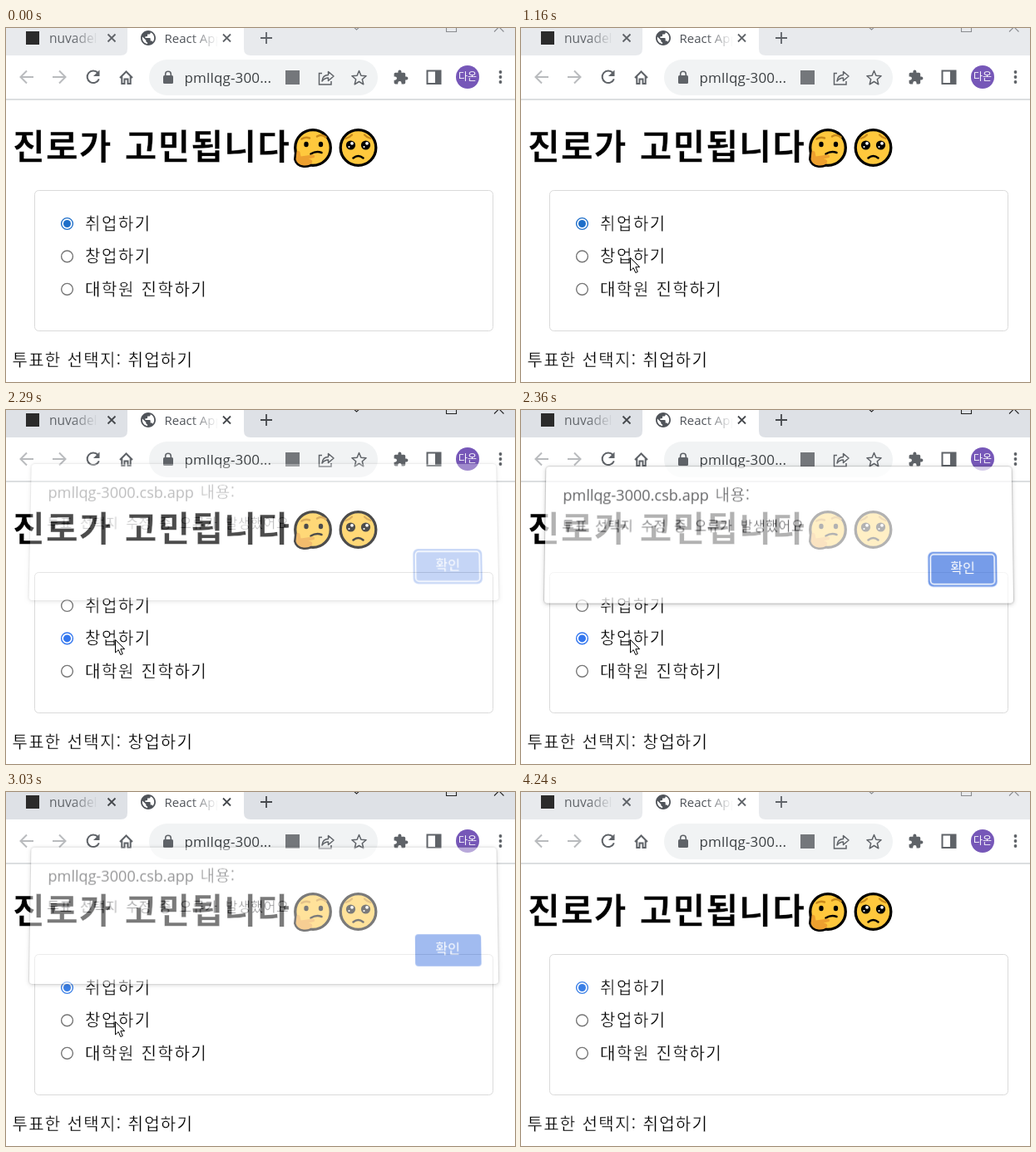
Recreate the animation shown at these times as an HTML page. Size 612 by 426 pixels, loop 4450 ms.

```html
<!DOCTYPE html>
<html lang="ko">
<head>
<meta charset="utf-8">
<title>투표</title>
<style>
html, body { margin: 0; width: 100%; height: 100%; overflow: hidden; background: #fff; }
svg { display: block; }
#page { position: absolute; left: 0; top: 0; }
#dialog {
  position: absolute; left: 30px; top: 81px; width: 560px; height: 163px;
  background: #fff; border-radius: 4px;
  box-shadow: 0 0 0 1px rgba(0,0,0,.16), 0 1px 5px rgba(0,0,0,.38);
}
text { white-space: pre; }
.ko { font-family: "Noto Sans CJK KR", "Noto Sans CJK", sans-serif; }
.en { font-family: "Open Sans", "Noto Sans", sans-serif; }
.body { font-size: 20px; letter-spacing: 1.55px; word-spacing: .5px; fill: #000; }
#result { letter-spacing: 1.25px; word-spacing: .3px; }
/* a hairline in the page colour gives lighter strokes */
.thin { stroke: #fff; stroke-width: .35px; }
.line { fill: none; stroke: #5f6368; stroke-width: 2; }
</style>
</head>
<body>
<svg id="page" width="612" height="426" viewBox="0 0 612 426">
  <defs>
    <linearGradient id="fadeA" gradientUnits="userSpaceOnUse" x1="80" x2="111" y1="0" y2="0">
      <stop stop-color="#5f6368"/><stop offset="1" stop-color="#5f6368" stop-opacity="0"/>
    </linearGradient>
    <linearGradient id="fadeB" gradientUnits="userSpaceOnUse" x1="222" x2="255" y1="0" y2="0">
      <stop stop-color="#50545a"/><stop offset="1" stop-color="#50545a" stop-opacity="0"/>
    </linearGradient>
    <path id="hand" d="M349.5 148.5Q352 146.5 353.5 149.5L354.5 154.5L368.5 152.5Q372.5 153 370.5 156L363.5 157.5Q369.5 158 368 162Q365 166 358 165.500Q350 164.500 348.500 158Z"/>
  </defs>

  <!-- tab strip -->
  <rect id="strip" width="612" height="33"/>
  <path d="M138 33Q146 33 146 25V0H286V25Q286 33 294 33Z" fill="#fff"/>
  <rect x="24" y="4" width="16" height="16" fill="#2b2b2b"/>
  <text class="en" x="52" y="17.5" font-size="15.5" fill="url(#fadeA)">nuvadel</text>
  <path transform="translate(160.2 1.2) scale(.9)" fill="#50545a" d="M12 2C6.48 2 2 6.48 2 12s4.48 10 10 10 10-4.48 10-10S17.52 2 12 2zm-1 17.93c-3.95-.49-7-3.85-7-7.93 0-.62.08-1.21.21-1.79L9 15v1c0 1.1.9 2 2 2v1.93zm6.9-2.54c-.26-.81-1-1.39-1.9-1.39h-1v-3c0-.55-.45-1-1-1H8v-2h2c.55 0 1-.45 1-1V7h2c1.1 0 2-.9 2-2v-.41c2.93 1.19 5 4.06 5 7.41 0 2.08-.8 3.97-2.1 5.39z"/>
  <text class="en" x="190.5" y="17.5" font-size="15" fill="url(#fadeB)">React App</text>
  <g id="tabMarks" fill="none" stroke-width="1.8">
    <path d="M122.5 7.5l9 9m0-9l-9 9M261 7.5l9 9m0-9l-9 9"/>
    <path d="M306 12H320M313 5V19"/>
  </g>
  <g id="winMarks" fill="none" stroke-width="1.1">
    <path d="M417 -2L421.5 2L426 -2M529.5 -7H541.5V4.5H529.5ZM587 -7L598.5 4.5M598.5 -7L587 4.5"/>
  </g>

  <!-- toolbar -->
  <rect y="33" width="612" height="53" fill="#fff"/>
  <path d="M0 86H612" stroke="#dcdee0" stroke-width="2"/>
  <g class="line">
    <path d="M33 59H18M25 51.5L17.5 59L25 66.5" stroke="#b9bbbe"/>
    <path d="M56 59H71M64 51.5L71.5 59L64 66.5" stroke="#b9bbbe"/>
    <path d="M110.5 54A7.3 7.3 0 1 0 111.8 61.3"/>
    <path d="M137 60L144.5 52.5L152 60M139.3 58V67H142.5V61.5H146.500V67H149.700V58"/>
  </g>
  <path d="M112.500 50.500V58H105Z" fill="#5f6368"/>
  <rect x="172" y="38" width="275" height="43" rx="21.500" fill="#f1f3f4"/>
  <g>
    <rect x="189" y="57" width="12" height="10" rx="1.500" fill="#5f6368"/>
    <path class="line" d="M191.700 57V55.500a3.300 3.300 0 0 1 6.600 0V57" style="stroke-width:1.600"/>
  </g>
  <text class="en" x="214.500" y="66" font-size="17" letter-spacing=".15" fill="#3c4043">pmllqg-300...</text>
  <rect x="336" y="51" width="17" height="17" fill="#74777b"/>
  <g class="line" style="stroke-width:1.500">
    <path d="M380 54.500H376.500V68H391V64"/>
    <path d="M380 64C380.500 59 383.500 56.500 387.500 56.500V52.500L394 58L387.500 63.500V60C384 60 382 61.500 380 64Z" stroke-linejoin="round"/>
    <path id="star" stroke-linejoin="round"/>
  </g>
  <path transform="translate(465 49.800) scale(.8)" fill="#5f6368" d="M20.500 11H19V7c0-1.100-.9-2-2-2h-4V3.500a2.500 2.500 0 0 0-5 0V5H4c-1.100 0-2 .9-2 2v3.800h1.500a2.700 2.700 0 0 1 0 5.400H2V20c0 1.100.9 2 2 2h3.800v-1.500a2.700 2.700 0 0 1 5.400 0V22H17c1.100 0 2-.9 2-2v-4h1.500a2.500 2.500 0 0 0 0-5z"/>
  <path d="M506.500 51.500H522.500V67H506.500Z" class="line"/>
  <rect x="516" y="51" width="7" height="16" fill="#5f6368"/>
  <circle cx="555" cy="59" r="14" fill="#7657b8"/>
  <text class="ko" x="555" y="63.300" font-size="12" text-anchor="middle" fill="#fff">다온</text>
  <g fill="#5f6368">
    <circle cx="594.500" cy="53" r="1.900"/><circle cx="594.500" cy="59" r="1.900"/><circle cx="594.500" cy="65" r="1.900"/>
  </g>

  <!-- heading -->
  <text class="ko thin" x="8" y="158" font-size="42" font-weight="700" letter-spacing="1.250" word-spacing="2">진로가 고민됩니다</text>
  <g stroke-linecap="round" fill="none">
    <use href="#hand" stroke="#000" stroke-width="5" stroke-linejoin="round"/>
    <circle cx="369" cy="144" r="21.300" fill="#ffc83d" stroke="#000" stroke-width="3.300"/>
    <g fill="#000"><ellipse cx="361" cy="140" rx="2.700" ry="3.200"/><ellipse cx="378.500" cy="140" rx="2.700" ry="3.200"/></g>
    <path d="M355.500 133.500Q360 130.500 365 132.500M374 130.500Q379.500 127 384.500 131.500" stroke="#c98a1b" stroke-width="2.500"/>
    <path d="M366.500 151.500Q373 147.500 379.500 150" stroke="#000" stroke-width="2.500"/>
    <use href="#hand" fill="#eda02f"/>

    <circle cx="423.500" cy="144" r="21.300" fill="#ffc83d" stroke="#000" stroke-width="3.300"/>
    <g fill="#000"><circle cx="414.500" cy="141" r="5.600"/><circle cx="432.500" cy="141" r="5.600"/></g>
    <g fill="#fff">
      <circle cx="416" cy="138.800" r="1.900"/><circle cx="434" cy="138.800" r="1.900"/>
      <circle cx="412.500" cy="143" r="1.100"/><circle cx="430.500" cy="143" r="1.100"/>
    </g>
    <path d="M408.500 133Q413 132 416 128.500M438.500 133Q434 132 431 128.500" stroke="#c98a1b" stroke-width="2.300"/>
    <path d="M417.500 156.500Q423.500 151.500 429.500 156.500" stroke="#000" stroke-width="2.500"/>
  </g>

  <!-- poll -->
  <rect x="34.500" y="195.500" width="551" height="169" rx="5" fill="#fff" stroke="#dadada"/>
  <g id="options"></g>
  <text id="result" class="ko body thin" x="7.500" y="407"></text>

  <path id="cursor" d="M.5 .5V16L4.200 12.600L6.800 18.500L9.300 17.400L6.800 11.700H11.700Z" fill="#fff" stroke="#000" stroke-width="1" stroke-linejoin="round"/>
</svg>

<div id="dialog">
  <svg width="560" height="163" viewBox="30 81 560 163">
    <text class="en" x="50.500" y="122" font-size="18.100" fill="#202124">pmllqg-3000.csb.app</text>
    <text class="ko thin" x="233.500" y="122.500" font-size="19" letter-spacing=".7" fill="#202124">내용:</text>
    <text class="ko thin" x="50" y="158" font-size="16" letter-spacing=".6" word-spacing="4" fill="#202124">투표 선택지 수정 중 오류가 발생했어요</text>
    <rect x="491" y="185" width="79" height="38" rx="4" fill="#3a71df"/>
    <g id="ring">
      <rect x="488.500" y="183" width="82.500" height="41.500" rx="6" fill="#3a71df"/>
      <rect x="491.500" y="186" width="76.500" height="35.500" rx="4" fill="none" stroke="#fff" stroke-width="1.500"/>
    </g>
    <text class="ko" x="530" y="208.500" font-size="16" font-weight="500" text-anchor="middle" fill="#fff">확인</text>
  </svg>
</div>

<script>
const LOOP = 4450, STEP = 70;
const $ = id => document.getElementById(id);
const choices = ["취업하기", "창업하기", "대학원 진학하기"];

$("options").innerHTML = choices.map((label, i) => {
  const y = 235.5 + i * 39.4;
  return `<circle cx="73.5" cy="${y}" r="6.9" fill="#fff" stroke-width="1.4"/>
    <circle cx="73.5" cy="${y}" r="4.5"/>
    <text class="ko body thin" x="95" y="${Math.round(y + 7.5)}">${label}</text>`;
}).join("");
const circles = [...$("options").querySelectorAll("circle")];

const starPoints = Array.from({ length: 10 }, (_, i) => {
  const r = i % 2 ? 4 : 9, a = -Math.PI / 2 + i * Math.PI / 5;
  return `${424.5 + r * Math.cos(a)} ${60.5 + r * Math.sin(a)}`;
});
$("star").setAttribute("d", `M${starPoints.join("L")}Z`);

// [start, opacity, vertical shift, tilt in degrees]
const dialogSteps = [
  [0, 0, 0, 0],
  [2290, .3, -16, 4], [2360, .7, -12.5, 3], [2430, .94, -3, .8], [2500, 1, 0, 0],
  [2960, .85, -7, 1.5], [3030, .48, -14, 3.2], [3100, .15, -16, 4], [3160, 0, 0, 0]
];

const mix = (a, b, u) => a + (b - a) * u;
const bend = (a, c, b, u) => mix(mix(a, c, u), mix(c, b, u), u);
const stepsSince = (t, start) => Math.floor((t - start) / STEP);

function cursorAt(t) {
  if (t < 460 || t >= 3630) return null;
  if (t < 1020) {
    const u = Math.min(stepsSince(t, 460) / 7, 1);
    return [bend(461, 275, 146, u), bend(237, 354, 285, u)];
  }
  if (t < 3490) {
    const u = Math.min((stepsSince(t, 1020) + 1) / 3, 1);
    return [mix(146, 131, u), mix(285, 276, u)];
  }
  const u = (stepsSince(t, 3490) + 1) / 2;
  return [mix(131, 431, u), mix(276, 410, u)];
}

function drawOptions(t) {
  const picked = t >= 1630 && t < 2960 ? 1 : 0;
  const blue = t < 1630 ? "#1f6fc9" : t < 2960 ? "#3477ee" : "#3a7fe6";
  choices.forEach((_, i) => {
    const [edge, dot] = circles.slice(i * 2);
    const pressed = i === 1 && t >= 1440 && t < 1630;
    edge.setAttribute("stroke", i === picked ? blue : pressed ? "#4f4f4f" : "#767676");
    dot.setAttribute("fill", i === picked ? blue : "none");
  });
  $("result").textContent = "투표한 선택지: " + choices[picked];
}

function drawWindow(t) {
  const active = t >= 1360 && t < 4240;
  $("strip").setAttribute("fill", active ? "#dee1e6" : "#e8eaed");
  $("tabMarks").setAttribute("stroke", active ? "#45484c" : "#5f6368");
  $("winMarks").setAttribute("stroke", active ? "#222" : "#8a8c90");
}

function drawDialog(t) {
  const [, opacity, dy, tilt] = dialogSteps.findLast(s => t >= s[0]);
  const box = $("dialog");
  box.style.visibility = opacity ? "visible" : "hidden";
  box.style.opacity = opacity;
  box.style.transform = tilt ? `translateY(${dy}px) perspective(1000px) rotateX(${tilt}deg) scale(1.003, 1.01)` : "none";
  $("ring").style.display = t < 2960 ? "" : "none";
}

function draw(t) {
  drawWindow(t);
  drawOptions(t);
  drawDialog(t);
  const at = cursorAt(t);
  $("cursor").style.display = at ? "" : "none";
  if (at) $("cursor").setAttribute("transform", `translate(${at.map(Math.round)})`);
}

const start = performance.now();
function tick() {
  draw((performance.now() - start) % LOOP);
  requestAnimationFrame(tick);
}
tick();
</script>
</body>
</html>
```
